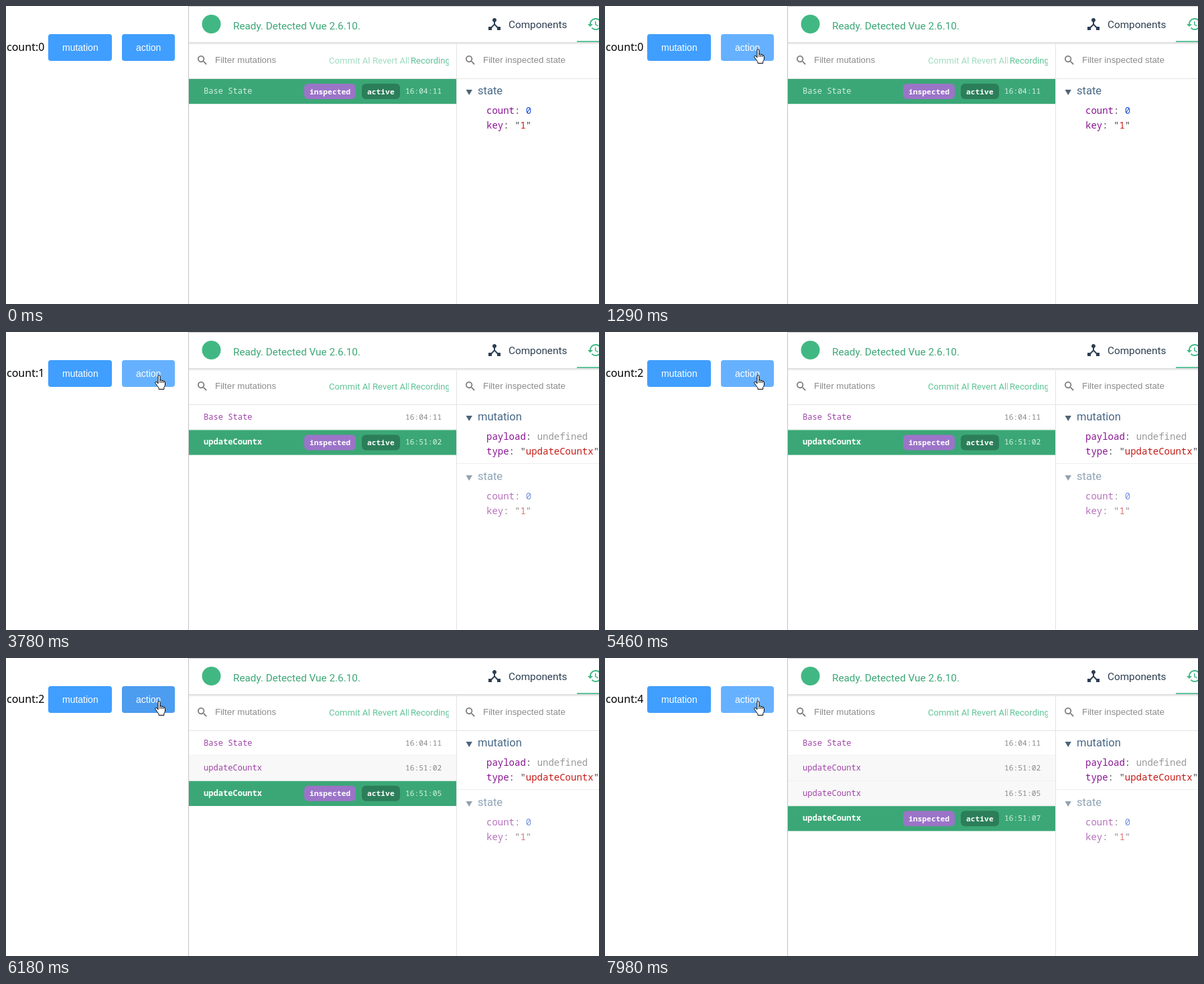
An HTML page that plays this animation: 885 by 445 pixels, repeating every 8 s.

```html
<!DOCTYPE html>
<html lang="en">
<head>
<meta charset="utf-8">
<title>Store inspector</title>
<style>
html, body { margin: 0; width: 100%; height: 100%; overflow: hidden; background: #fff; }
svg { display: block; }
text { white-space: pre; }
.page { font: 16px "Noto Sans", sans-serif; }
.button { font: 14px "Liberation Sans", Arial, sans-serif; fill: #fff; }
.input { font: 13.33px "Liberation Sans", Arial, sans-serif; fill: #8c8c8c; }
.title { font: 15.3px Roboto, sans-serif; }
.tool { font: 13.1px Roboto, sans-serif; fill: #41b883; }
.section { font: 16.5px Roboto, sans-serif; fill: #486887; }
.tree { font: 14px "Noto Sans Mono", monospace; fill: #444; }
.name { font: 12.1px "Noto Sans Mono", monospace; }
.small { font: 11.3px "Noto Sans Mono", monospace; }
.badge { font-weight: 600; fill: #fff; }
.key { fill: #881391; }
.number { fill: #1c4fd0; }
.string { fill: #c41a16; }
.none { fill: #999; }
</style>
</head>
<body>
<svg width="885" height="445" viewBox="0 0 885 445">
  <defs>
    <linearGradient id="shade" x2="0" y2="1">
      <stop stop-color="#000" stop-opacity=".16"/>
      <stop offset="1" stop-color="#000" stop-opacity="0"/>
    </linearGradient>
    <path id="search" transform="scale(.78)" fill="#777" d="M15.5 14h-.79l-.28-.27C15.41 12.59 16 11.11 16 9.5 16 5.91 13.09 3 9.5 3S3 5.91 3 9.5 5.91 16 9.5 16c1.61 0 3.09-.59 4.23-1.57l.27.28v.79l5 4.99L20.49 19l-4.99-5zm-6 0C7.01 14 5 11.99 5 9.5S7.01 5 9.5 5 14 7.01 14 9.5 11.99 14 9.5 14z"/>
  </defs>

  <text class="page" x="1" y="67">count:<tspan id="count">0</tspan></text>
  <rect x="63" y="42" width="95" height="40" rx="4" fill="#409eff"/>
  <text class="button" x="84" y="67">mutation</text>
  <rect id="action" x="173" y="42" width="79" height="40" rx="4"/>
  <text class="button" x="194" y="67">action</text>

  <rect x="272" width="613" height="1" fill="#ccc"/>
  <rect x="272" width="1" height="445" fill="#c4c4c4"/>
  <rect x="273" y="54" width="612" height="4" fill="url(#shade)"/>
  <circle cx="306.5" cy="27" r="14" fill="#41b883"/>
  <text class="title" x="339" y="35" fill="#3ba776">Ready. Detected Vue 2.6.10.</text>
  <path transform="translate(717 15)" fill="#2c3e50" d="M17 16l-4-4V8.82C14.16 8.4 15 7.3 15 6c0-1.66-1.34-3-3-3S9 4.34 9 6c0 1.3.84 2.4 2 2.82V12l-4 4H3v5h5v-3.05l4-4.2 4 4.2V21h5v-5h-4z"/>
  <text class="title" x="750" y="33" fill="#2c3e50">Components</text>
  <path transform="translate(867 15)" fill="#41b883" d="M13 3c-4.97 0-9 4.03-9 9H1l3.89 3.89.07.14L9 12H6c0-3.87 3.13-7 7-7s7 3.13 7 7-3.13 7-7 7c-1.93 0-3.68-.79-4.94-2.06l-1.42 1.42C8.27 19.99 10.51 21 13 21c4.97 0 9-4.03 9-9s-4.03-9-9-9zm-1 5v5l4.28 2.54.72-1.21-3.5-2.08V8H12z"/>
  <rect x="852" y="52" width="33" height="2" fill="#5fc49b"/>

  <use href="#search" x="0" y="0" transform="translate(283.7 71.7)"/>
  <text class="input" x="312" y="85">Filter mutations</text>
  <use href="#search" transform="translate(683.7 71.7)"/>
  <text class="input" x="712" y="85">Filter inspected state</text>
  <g id="tools">
    <svg x="482" y="70" width="62" height="24"><text class="tool" y="16">Commit All</text></svg>
    <svg x="547" y="70" width="54" height="24"><text class="tool" y="16">Revert All</text></svg>
  </g>
  <svg x="604" y="70" width="57" height="24"><text class="tool" y="16" opacity=".85">Recording</text></svg>
  <rect x="273" y="108" width="612" height="1" fill="#e4e4e4"/>

  <g id="rows"></g>
  <rect x="672" y="57" width="1" height="388" fill="#e4e4e4"/>
  <g id="before"></g>
  <g id="after"></g>

  <path id="arrow" fill="#fff" stroke="#000" d="M.5.5V16L4 12.7 6.4 18.2 8.6 17.2 6.2 11.8H11z"/>
  <g id="hand" fill="#fff" stroke="#000" stroke-linejoin="round">
    <path d="M-1 13V2Q-1 .5.5 .5T2 2V8Q4 7 4.7 8.5 6.5 7.8 7.2 9.3 9.5 9 9.5 11.5V15Q9.5 17 7.8 18.5V21.5H0V19.5Q-2 17-5 12.5-5.7 10.8-4.4 10.3-2.8 9.8-1 13z"/>
    <path fill="none" d="M2 7.5V12M4.7 8.5V12M7.2 9.3V12"/>
  </g>
</svg>

<script>
const LOOP = 8000;
const ROW_HEIGHT = 37.4;
const COUNT_TIMES = [3000, 5460, 7680, 7980];
const ROW_TIMES = [3150, 5520, 7710];
const SINGLE_CLICKS = [[1230, 1290], [3660, 3780]];
const FAST_CLICKS = [5880, 6180, 6480];
const BLUE = [64, 158, 255], HOVER = [102, 177, 255], PRESSED = [58, 142, 230];

const el = id => document.getElementById(id);
const show = (node, on) => node.setAttribute("display", on ? "inline" : "none");
const clamp = v => Math.max(0, Math.min(1, v));
const mix = (a, b, k) => a.map((v, i) => v + (b[i] - v) * k);
const passed = (times, t) => times.filter(x => t >= x).length;

function badge(x, y, width, color, label) {
  return `<rect x="${x}" y="${y}" width="${width}" height="23" rx="6" fill="${color}"/>
    <text class="small badge" x="${x + 8}" y="${y + 15.5}">${label}</text>`;
}

function rowMarkup([name, time], i) {
  const top = 109 + ROW_HEIGHT * i;
  const base = i === 0;
  const slant = base ? 'font-style="italic"' : "";
  const label = (color, timeColor, weight) => `
    <text class="name" x="295" y="${top + 22}" fill="${color}" ${slant} style="font-weight:${weight}">${name}</text>
    <text class="small" x="596" y="${top + 22}" fill="${timeColor}" style="font-weight:${weight > 400 || base ? 500 : 400}">${time}</text>`;
  return `<g>
    <g>
      <rect x="273" y="${top}" width="399" height="${ROW_HEIGHT}" fill="${base ? "#fff" : "#f8f8f8"}"/>
      <rect x="273" y="${Math.round(top + ROW_HEIGHT) - 1}" width="399" height="1" fill="#eee"/>
      ${label("#9f43a8", "#888", 400)}
    </g>
    <g>
      <rect x="273" y="${top}" width="399" height="37.2" fill="#3ba776"/>
      ${label(base ? "#d2eee0" : "#fff", "#d8f2e6", base ? 400 : 600)}
      ${badge(445, top + 7, 77, "#9b74c8", "inspected")}
      ${badge(531, top + 7, 57, "#2b7e59", "active")}
    </g>
  </g>`;
}

function sectionMarkup(y, title, fields, opacity = 1) {
  const lines = fields.map(([key, kind, value], i) => {
    const quote = kind === "string" ? '"' : "";
    return `<text class="tree" x="717" y="${y + 29 + 22 * i}"><tspan class="key">${key}</tspan>: ${quote}<tspan class="${kind}">${value}</tspan>${quote}</text>`;
  });
  return `<g opacity="${opacity}">
    <path d="M686.5 ${y - 7}h9.4l-4.7 8z" fill="#4c6478"/>
    <text class="section" x="704" y="${y}">${title}</text>${lines.join("")}
  </g>`;
}

const stateFields = [["count", "number", 0], ["key", "string", 1]];
const mutationFields = [["payload", "none", "undefined"], ["type", "string", "updateCountx"]];

el("rows").innerHTML = [
  ["Base State", "16:04:11"],
  ["updateCountx", "16:51:02"],
  ["updateCountx", "16:51:05"],
  ["updateCountx", "16:51:07"]
].map(rowMarkup).join("");
el("before").innerHTML = sectionMarkup(132, "state", stateFields);
el("after").innerHTML = sectionMarkup(132, "mutation", mutationFields)
  + '<rect x="673" y="196" width="212" height="1" fill="#eee"/>'
  + sectionMarkup(221, "state", stateFields, 0.6);

function pressAmount(t) {
  if (SINGLE_CLICKS.some(([down, up]) => t >= down && t < up)) return 1;
  for (const start of FAST_CLICKS) {
    const age = t - start;
    if (age >= 0 && age < 120) return age < 60 ? 0.6 : age < 90 ? 1 : 0.5;
  }
  return 0;
}

// Pointer tip follows a quadratic curve, slowing down towards the button.
function pointerAt(t) {
  const u = clamp((Math.floor(t / 30) * 30 - 420) / 360);
  const k = 1 - (1 - u) ** 1.5;
  const curve = (a, b, c) => a * (1 - k) ** 2 + 2 * b * k * (1 - k) + c * k * k;
  return [curve(277, 272, 228), curve(15, 95, 64)].map(Math.round);
}

function render(t) {
  const [x, y] = pointerAt(t);
  const over = x < 252;
  show(el("arrow"), t >= 420 && !over);
  show(el("hand"), t >= 420 && over);
  for (const id of ["arrow", "hand"]) el(id).setAttribute("transform", `translate(${x} ${y})`);

  const hover = over ? clamp((t - 600) / 100) : 0;
  const fill = mix(mix(BLUE, HOVER, hover), PRESSED, pressAmount(t));
  el("action").setAttribute("fill", `rgb(${fill.map(Math.round)})`);

  el("count").textContent = passed(COUNT_TIMES, t);
  const current = passed(ROW_TIMES, t);
  [...el("rows").children].forEach((row, i) => {
    show(row, i <= current);
    show(row.children[0], i < current);
    show(row.children[1], i === current);
  });
  show(el("before"), current === 0);
  show(el("after"), current > 0);
  el("tools").setAttribute("opacity", 0.5 + 0.33 * clamp((t - 3150) / 150));
}

function frame() {
  render(performance.now() % LOOP);
  requestAnimationFrame(frame);
}
frame();
</script>
</body>
</html>
```
